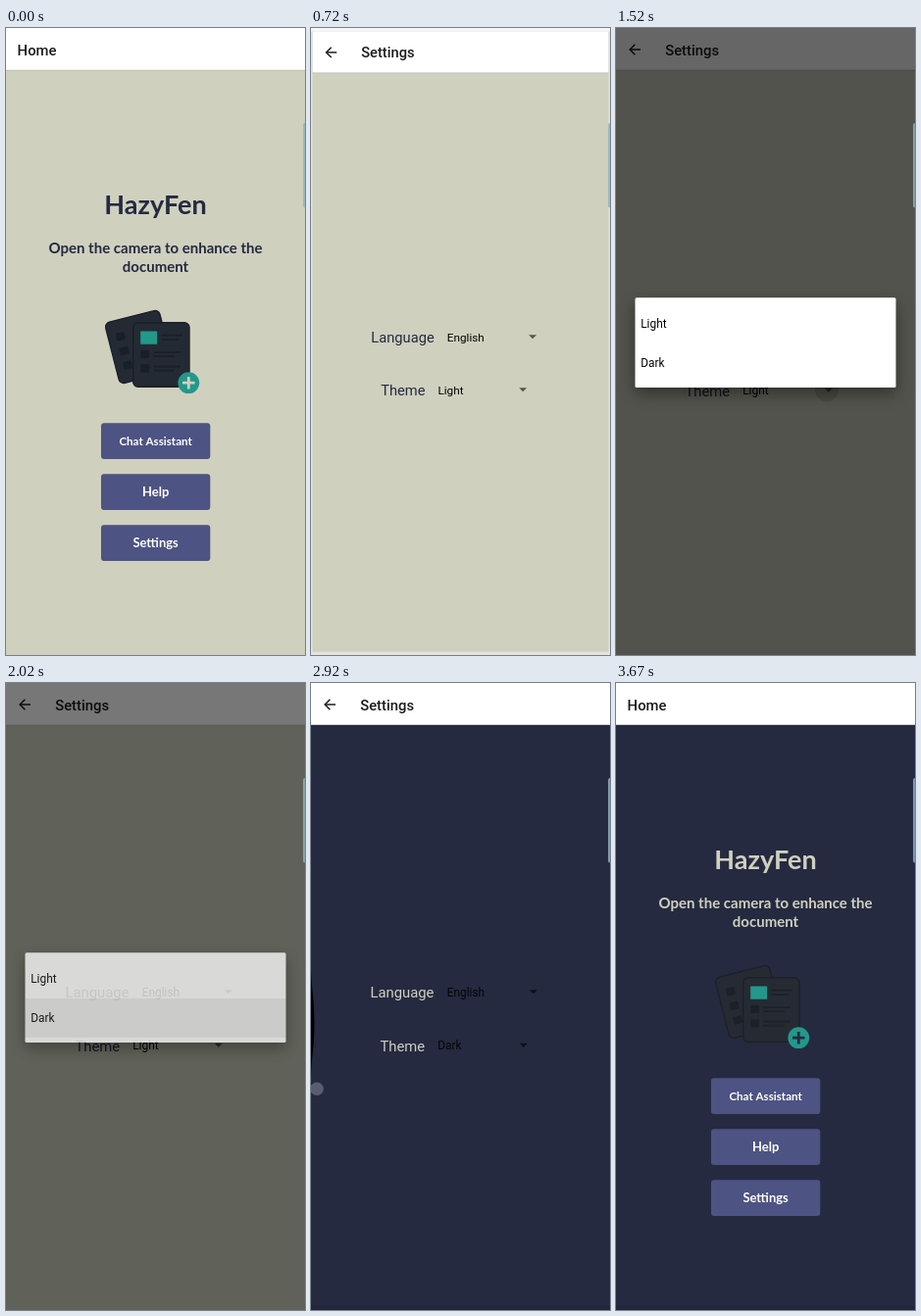
An HTML page with a canvas for the animation above (4450 ms loop, 305 px wide and 640 px high).

```html
<!DOCTYPE html>
<html lang="en">
<head>
<meta charset="utf-8">
<title>App demo</title>
<style>
  html, body { margin: 0; width: 100%; height: 100%; overflow: hidden; background: #f2f2f2; }
  canvas { display: block; width: 305px; height: 640px; }
</style>
</head>
<body>
<canvas id="stage"></canvas>
<script>
const W = 305, H = 640, LOOP = 4450;
const dpr = window.devicePixelRatio || 1;
const stage = document.getElementById('stage');
const buffer = document.createElement('canvas');
for (const c of [stage, buffer]) {
  c.width = Math.round(W * dpr);
  c.height = Math.round(H * dpr);
}
const out = stage.getContext('2d');
const buf = buffer.getContext('2d');

const TICKS = [0, 360, 450, 540, 630, 720, 820, 1220, 1320, 1420, 1520, 1620,
  1920, 2020, 2120, 2220, 2920, 3030, 3130, 3230, 3340, 3450, 3560, 3670];

const LIGHT = { bg: '#cfd0be', ink: '#242a40', card: '#242a33', line: '#1a1f27', caret: '#55564f' };
const DARK = { bg: '#252a40', ink: '#cfd0be', card: '#262b33', line: '#1c2028', caret: '#0d0f17' };
const TEAL = '#23988a', BUTTON = '#4d5382';
const UI = 'Roboto, sans-serif', BRAND = 'Lato, sans-serif';

const clamp = v => Math.min(1, Math.max(0, v));
const ramp = (t, start, length) => clamp((t - start) / length);
const easeOut = p => 1 - (1 - p) ** 3;

function rect(g, x, y, w, h, color, r = 0) {
  g.beginPath();
  g.roundRect(x, y, w, h, r);
  g.fillStyle = color;
  g.fill();
}

function disc(g, x, y, r, color) {
  g.beginPath();
  g.arc(x, y, r, 0, Math.PI * 2);
  g.fillStyle = color;
  g.fill();
}

function label(g, str, x, y, font, color, align = 'left') {
  g.font = font;
  g.textAlign = align;
  g.fillStyle = color;
  g.fillText(str, x, y);
}

function path(g, points, color, width) {
  g.beginPath();
  points.forEach(([x, y], i) => i ? g.lineTo(x, y) : g.moveTo(x, y));
  g.strokeStyle = color;
  g.lineWidth = width;
  g.stroke();
}

// Paints a group scaled about the centre, then blends it as one piece.
function layer(alpha, scale, paint) {
  if (alpha <= 0) return;
  buf.setTransform(1, 0, 0, 1, 0, 0);
  buf.clearRect(0, 0, buffer.width, buffer.height);
  buf.setTransform(dpr * scale, 0, 0, dpr * scale,
    dpr * W / 2 * (1 - scale), dpr * H / 2 * (1 - scale));
  paint(buf);
  out.save();
  out.setTransform(1, 0, 0, 1, 0, 0);
  out.globalAlpha = alpha;
  out.drawImage(buffer, 0, 0);
  out.restore();
}

function page(g, theme, title, titleX) {
  rect(g, 0, 0, W, H, theme.bg);
  if (theme === DARK) rect(g, 0, 636, W, 4, 'rgba(0,0,0,.1)');
  rect(g, 0, 0, W, 43.5, 'rgba(0,0,0,.12)');
  rect(g, 0, 0, W, 42.7, '#fff');
  label(g, title, titleX, 27.6, '500 14.84px ' + UI, '#1c1c1e');
}

function sheet(g, w, h, theme) {
  rect(g, 0, 0, w, h, theme.card, 5);
  g.strokeStyle = theme.line;
  g.lineWidth = 1.4;
  g.stroke();
}

function documents(g, theme) {
  g.save();
  g.translate(100.5, 301.5);
  g.rotate(-0.25);
  sheet(g, 57, 64, theme);
  for (let i = 0; i < 3; i++) rect(g, 8, 13 + i * 15, 9, 8, theme.line, 1);
  g.restore();

  g.save();
  g.translate(129.7, 300.8);
  sheet(g, 57.3, 65.5, theme);
  rect(g, 7.5, 8.7, 17, 13.3, TEAL, 0.5);
  rect(g, 28.5, 12, 22, 1.6, theme.line, 0.8);
  rect(g, 28.5, 16.5, 18, 1.6, theme.line, 0.8);
  for (const y of [28, 42.5]) {
    rect(g, 7.5, y, 9, 8.3, theme.line, 1);
    rect(g, 20.5, y + 1.5, 28, 1.6, theme.line, 0.8);
    rect(g, 20.5, y + 5.5, 22, 1.6, theme.line, 0.8);
  }
  g.restore();

  disc(g, 186.3, 362.2, 10.9, TEAL);
  rect(g, 180, 360.8, 12.6, 2.8, theme.bg, 0.6);
  rect(g, 184.9, 355.9, 2.8, 12.6, theme.bg, 0.6);
}

function button(g, str, y, size, alpha = 1) {
  g.save();
  g.globalAlpha = alpha;
  rect(g, 97, y, 111.3, 36.8, BUTTON, 3);
  label(g, str, 152.6, y + 18.2 + size * 0.36, `bold ${size}px ${BRAND}`, '#fff', 'center');
  g.restore();
}

function home(g, theme, pressed) {
  page(g, theme, 'Home', 11.6);
  label(g, 'HazyFen', 152.5, 189.6, 'bold 27px ' + BRAND, theme.ink, 'center');
  const font = 'bold 15px ' + BRAND;
  label(g, 'Open the camera to enhance the', 152.5, 230.3, font, theme.ink, 'center');
  label(g, 'document', 152.5, 248.8, font, theme.ink, 'center');
  documents(g, theme);
  button(g, 'Chat Assistant', 403.2, 11.6);
  button(g, 'Help', 455.2, 13);
  button(g, 'Settings', 507.2, 13, pressed);
}

function caret(g, x, y, color) {
  g.beginPath();
  g.moveTo(x - 4, y - 2);
  g.lineTo(x + 4, y - 2);
  g.lineTo(x, y + 2);
  g.fillStyle = color;
  g.fill();
}

function row(g, theme, name, nameX, value, valueX, caretX, y) {
  label(g, name, nameX, y + 5.8, '14.84px ' + UI, theme.ink);
  label(g, value, valueX, y + 4.3, '11.87px ' + UI, '#050505');
  caret(g, caretX, y, theme.caret);
}

function settings(g, theme, ripple) {
  page(g, theme, 'Settings', 50.2);
  path(g, [[25, 22], [14.4, 22]], '#1c1c1e', 1.5);
  path(g, [[19.4, 16.8], [14.2, 22], [19.4, 27.2]], '#1c1c1e', 1.5);
  if (ripple) disc(g, 215, 369.2, ripple, 'rgba(0,0,0,.12)');
  row(g, theme, 'Language', 60.4, 'English', 138.7, 226.8, 315.2);
  row(g, theme, 'Theme', 70.4, theme === DARK ? 'Dark' : 'Light', 129.2, 216.8, 369.8);
}

function dialog(g, pressed) {
  g.save();
  g.shadowColor = 'rgba(0,0,0,.4)';
  g.shadowBlur = 16 * dpr;
  g.shadowOffsetY = 6 * dpr;
  rect(g, 19.5, 275.3, 266, 91.7, '#fff', 1.5);
  g.restore();
  if (pressed) rect(g, 19.5, 322, 266, 40, 'rgba(0,0,0,.07)');
  label(g, 'Light', 25.2, 305.8, '11.87px ' + UI, '#050505');
  label(g, 'Dark', 25.2, 345.8, '11.87px ' + UI, '#050505');
}

function swipeBulge(g, w) {
  g.beginPath();
  g.moveTo(0, 285);
  g.bezierCurveTo(0, 312, w, 318, w, 347);
  g.bezierCurveTo(w, 376, 0, 382, 0, 409);
  g.fillStyle = '#000';
  g.fill();
}

function draw(t) {
  out.setTransform(dpr, 0, 0, dpr, 0, 0);
  rect(out, 0, 0, W, H, '#f2f2f2');
  const theme = t >= 2100 ? DARK : LIGHT;

  const open = easeOut(ramp(t, 481, 400));
  const back = ramp(t, 3090, 327);
  const closed = easeOut(back);

  if (t < 900) {
    const pressed = t < 360 ? 1 : 1 - 0.7 * ramp(t, 300, 150);
    layer(1 - 0.6 * ramp(t, 481, 55), 1 + 0.15 * open, g => home(g, theme, pressed));
  } else if (back > 0) {
    layer(0.4 + 0.6 * clamp(back * 1.64), 1.15 - 0.15 * closed, g => home(g, theme, 1));
  }

  const shown = back > 0 ? 1 - clamp(back * 5) : ramp(t, 540, 80);
  const size = back > 0 ? 1 - 0.15 * closed : 0.85 + 0.15 * open;
  const ripple = t >= 1220 && t < 1620 ? 12 * ramp(t, 1150, 150) : 0;
  layer(shown, size, g => settings(g, theme, ripple));

  if (t >= 1220 && t < 1420) disc(out, 204.2, 367, 6.4, 'rgba(226,229,232,.72)');

  const enter = ramp(t, 1380, 130), leave = ramp(t, 2000, 180);
  if (enter > 0 && leave < 1) {
    rect(out, 0, 0, W, H, `rgba(0,0,0,${0.6 * enter * (1 - leave)})`);
    layer(enter * (1 - leave) ** 2.3, 1, g => dialog(g, t >= 1920 && t < 2100));
  }

  if (t >= 2920 && t < 3270) {
    swipeBulge(out, 14 * Math.sin(Math.PI * (t - 2890) / 380));
    const alpha = 0.35 - 0.2 * ramp(t, 3130, 100);
    disc(out, 6 + 39 * ramp(t, 2920, 200), 414.3, 6.8, `rgba(190,190,205,${alpha})`);
  }

  rect(out, 303, 97, 3, 86.5, 'rgba(146,178,192,.82)', [2, 0, 0, 2]);
}

const begin = performance.now();
let last = -1;
function frame() {
  const t = (performance.now() - begin) % LOOP;
  const tick = TICKS.findLast(v => v <= t);
  if (tick !== last) draw(last = tick);
  requestAnimationFrame(frame);
}
frame();
</script>
</body>
</html>
```
